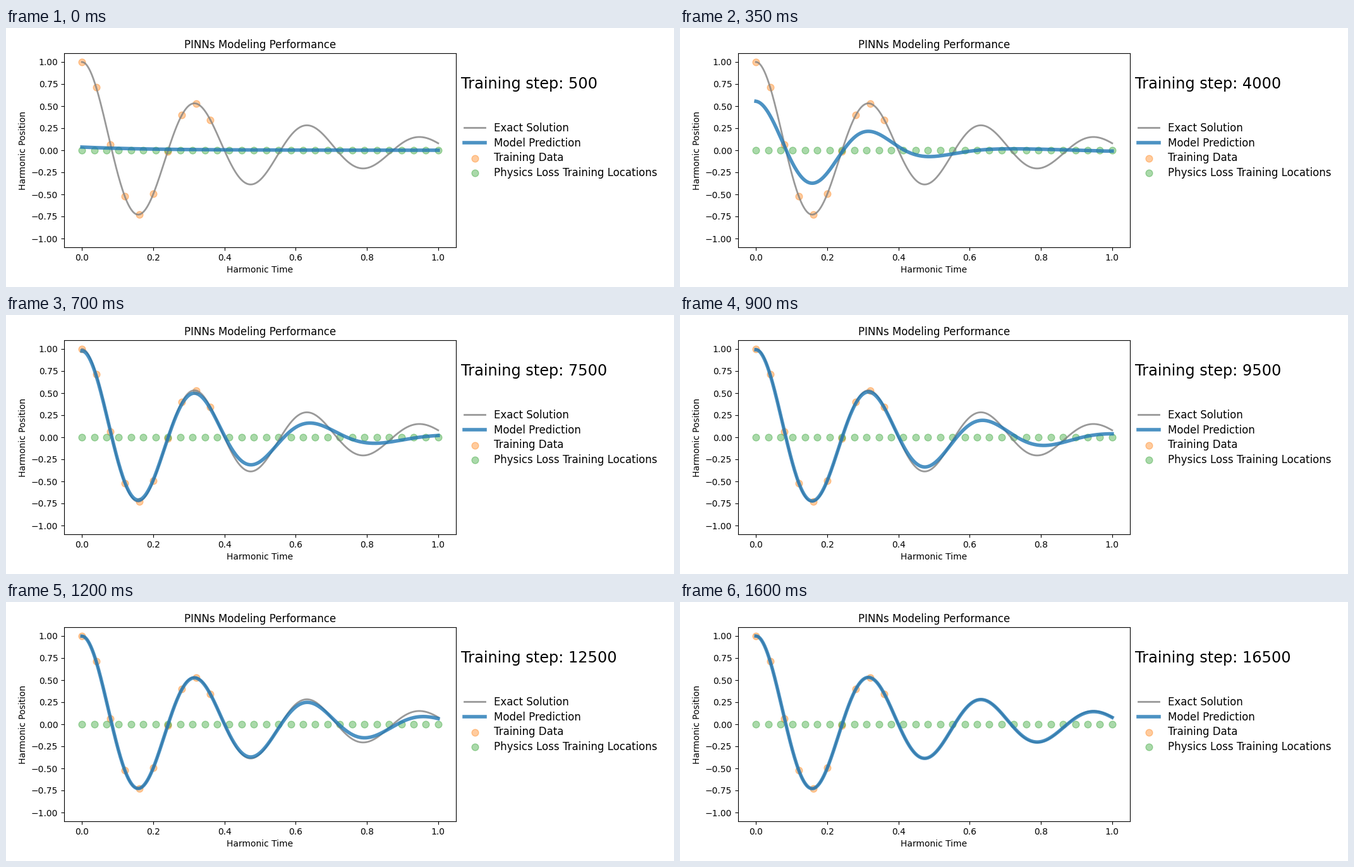
Animation of 1057 by 411 pixels, one loop 1.65 s. Source, as a matplotlib script:

```python
import numpy as np
import matplotlib.pyplot as plt
from matplotlib.animation import FuncAnimation

WIDTH, HEIGHT, DPI = 1057, 411, 100
FRAMES, INTERVAL, STEPS_PER_FRAME = 33, 50, 500
DAMPING, NATURAL_FREQ = 2, 20
OMEGA = np.sqrt(NATURAL_FREQ**2 - DAMPING**2)
PHASE = np.arctan(-DAMPING / OMEGA)

# Training steps at which the model starts to oscillate and has fitted the data.
ONSET, FITTED = 3000, 5500


def oscillator(x):
    return np.exp(-DAMPING * x) * np.cos(PHASE + OMEGA * x) / np.cos(PHASE)


def early_guess(x, step):
    """Nearly flat curve that slowly bends into a weak ripple."""
    flat = 0.036 * np.exp(-x / 0.2)
    ripple = (0.102 * (1 - x / 0.125) * (1 - x / 0.37) * (1 - x / 0.93)
              * np.exp(-3.3 * x**2))
    mix = np.clip((step - STEPS_PER_FRAME) / (ONSET - STEPS_PER_FRAME), 0, 1)
    return (1 - mix) * flat + mix * ripple


def fitted_wave(x, step):
    """Exact wave that fades and lags beyond a front moving right."""
    front = np.interp(step, [3000, 5500, 7500, 11500, 14000, 16500],
                      [0.40, 0.53, 0.70, 0.85, 1.33, 2.00])
    distance = (x / front)**4
    amplitude = 1 - 0.06 * np.exp((FITTED - step) / 2000)
    return amplitude * oscillator(x - 0.022 * distance) / (1 + distance)


def prediction(x, step):
    progress = np.clip((step - ONSET) / (FITTED - ONSET), 0, 1)
    weight = np.sin(progress * np.pi / 2)
    return (1 - weight) * early_guess(x, step) + weight * fitted_wave(x, step)


x = np.linspace(0, 1, 500)
x_data = x[0:200:20]
x_physics = np.linspace(0, 1, 30)

fig = plt.figure(figsize=(WIDTH / DPI, HEIGHT / DPI), dpi=DPI, facecolor="white")
ax = fig.add_axes([92 / WIDTH, 63 / HEIGHT, 620 / WIDTH, 308 / HEIGHT])
ax.plot(x, oscillator(x), color="grey", linewidth=2, alpha=0.8, label="Exact Solution")
model_line, = ax.plot(x, prediction(x, STEPS_PER_FRAME), color="tab:blue", linewidth=4,
                      alpha=0.8, label="Model Prediction")
ax.scatter(x_data, oscillator(x_data), s=60, color="tab:orange", alpha=0.4,
           label="Training Data")
ax.scatter(x_physics, np.zeros_like(x_physics), s=60, color="tab:green", alpha=0.4,
           label="Physics Loss Training Locations")
ax.legend(loc=(1.01, 0.333), frameon=False, fontsize="large", labelspacing=0.33)
ax.set(xlim=(-0.05, 1.05), ylim=(-1.1, 1.1), title="PINNs Modeling Performance",
       xlabel="Harmonic Time", ylabel="Harmonic Position")
step_text = ax.text(1.065, 0.7, "", fontsize="xx-large", color="k")


def update(frame):
    step = (frame + 1) * STEPS_PER_FRAME
    model_line.set_ydata(prediction(x, step))
    step_text.set_text(f"Training step: {step}")
    return model_line, step_text


anim = FuncAnimation(fig, update, frames=FRAMES, interval=INTERVAL, repeat=True,
                     repeat_delay=0)
plt.show()
```
